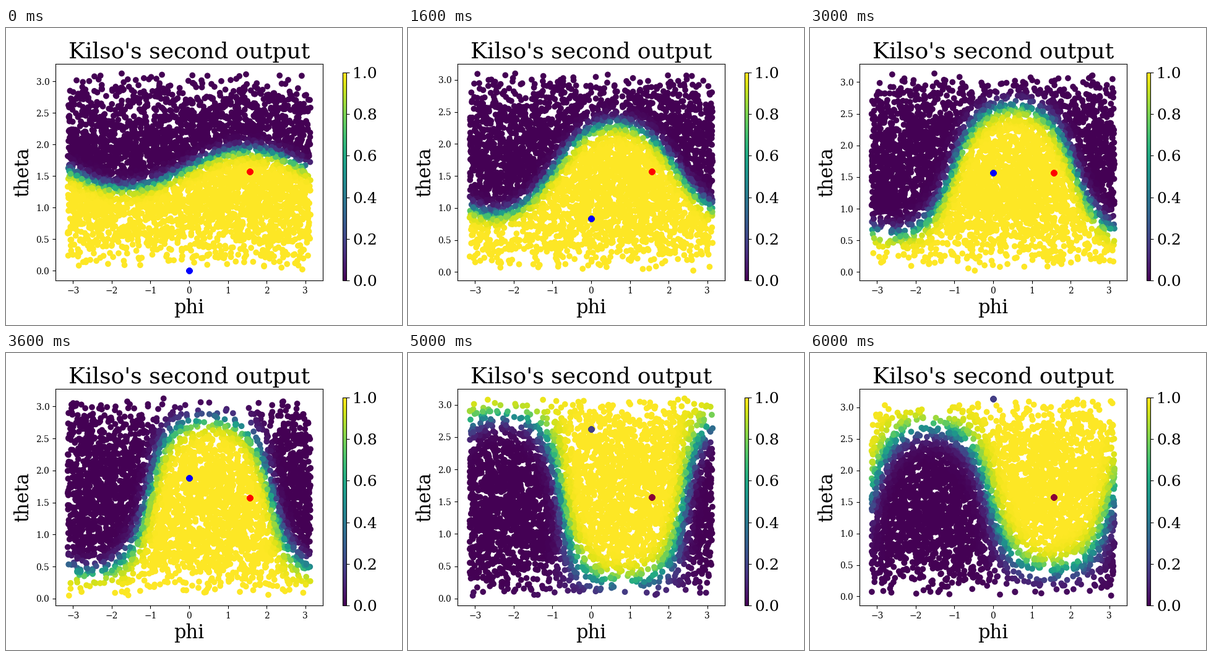
A matplotlib script for the animation above (6200 ms loop, 640 by 480 pixels).

```python
import numpy as np
import matplotlib.pyplot as plt
from matplotlib.animation import FuncAnimation
from matplotlib.cm import ScalarMappable

FRAMES, INTERVAL = 31, 200
POINTS = 4000
OVERDRAW = 50  # stacked markers give the dots their hard edge

plt.rcParams["font.family"] = "DejaVu Serif"


def sample(step):
    """Random directions, uniform on the sphere."""
    rng = np.random.default_rng(100 + step)
    phi = rng.uniform(-np.pi, np.pi, POINTS)
    theta = np.arccos(rng.uniform(-1, 1, POINTS))
    return phi, theta


def output(s, phi, theta):
    """Sigmoid across a plane whose normal swings from the north pole to the south."""
    tilt = 0.3 + 1.7 * s - 0.14 * np.sin(2 * np.pi * s**2.2)
    azimuth = 0.53 + 0.97 * abs(2 * s - 1)**3
    sharpness = 21 - 10 * s
    bias = 1.1 - 0.7 * s
    along = (np.cos(tilt) * np.cos(theta)
             + np.sin(tilt) * np.sin(theta) * np.cos(phi - azimuth))
    return 1 / (1 + np.exp(-sharpness * along - bias))


def stack(phi, theta):
    return np.tile([phi, theta], (OVERDRAW, 1))


fig, ax = plt.subplots(figsize=(6.4, 4.8), dpi=100)
fig.subplots_adjust(left=0.125, right=0.8, bottom=0.15, top=0.88)

cloud = ax.scatter(np.zeros(POINTS), np.zeros(POINTS), c=np.zeros(POINTS),
                   cmap="viridis", vmin=0, vmax=1)
red = ax.scatter(*stack(np.pi / 2, np.pi / 2).T, c="red")
blue = ax.scatter(*stack(0, 0).T, c="blue")

ax.set_title("Kilso's second output", fontsize=26)
ax.set_xlabel("phi", fontsize=22)
ax.set_ylabel("theta", fontsize=22)
ax.set_xlim(-1.1 * np.pi, 1.1 * np.pi)
ax.set_xticks(range(-3, 4))
ax.set_yticks(np.arange(0, 3.1, 0.5))

cax = fig.add_axes([0.85, 0.15, 0.01, 0.7])
bar = fig.colorbar(ScalarMappable(cmap="viridis"), cax=cax,
                   ticks=np.linspace(0, 1, 6))
bar.ax.tick_params(labelsize=18)


def update(step):
    s = step / (FRAMES - 1)
    phi, theta = sample(step)
    cloud.set_offsets(np.column_stack([phi, theta]))
    cloud.set_array(output(s, phi, theta))

    pole = np.pi * s
    blue.set_offsets(stack(0, pole))
    late = s > 0.8
    red.set_color("#8a0038" if late else "red")
    blue.set_color("#433e85" if late else "blue")

    low, high = min(theta.min(), pole), max(theta.max(), pole)
    margin = 0.05 * (high - low)
    ax.set_ylim(low - margin, high + margin)
    return cloud, red, blue


anim = FuncAnimation(fig, update, frames=FRAMES, interval=INTERVAL,
                     init_func=lambda: update(0), repeat=True, repeat_delay=0)
plt.show()
```
